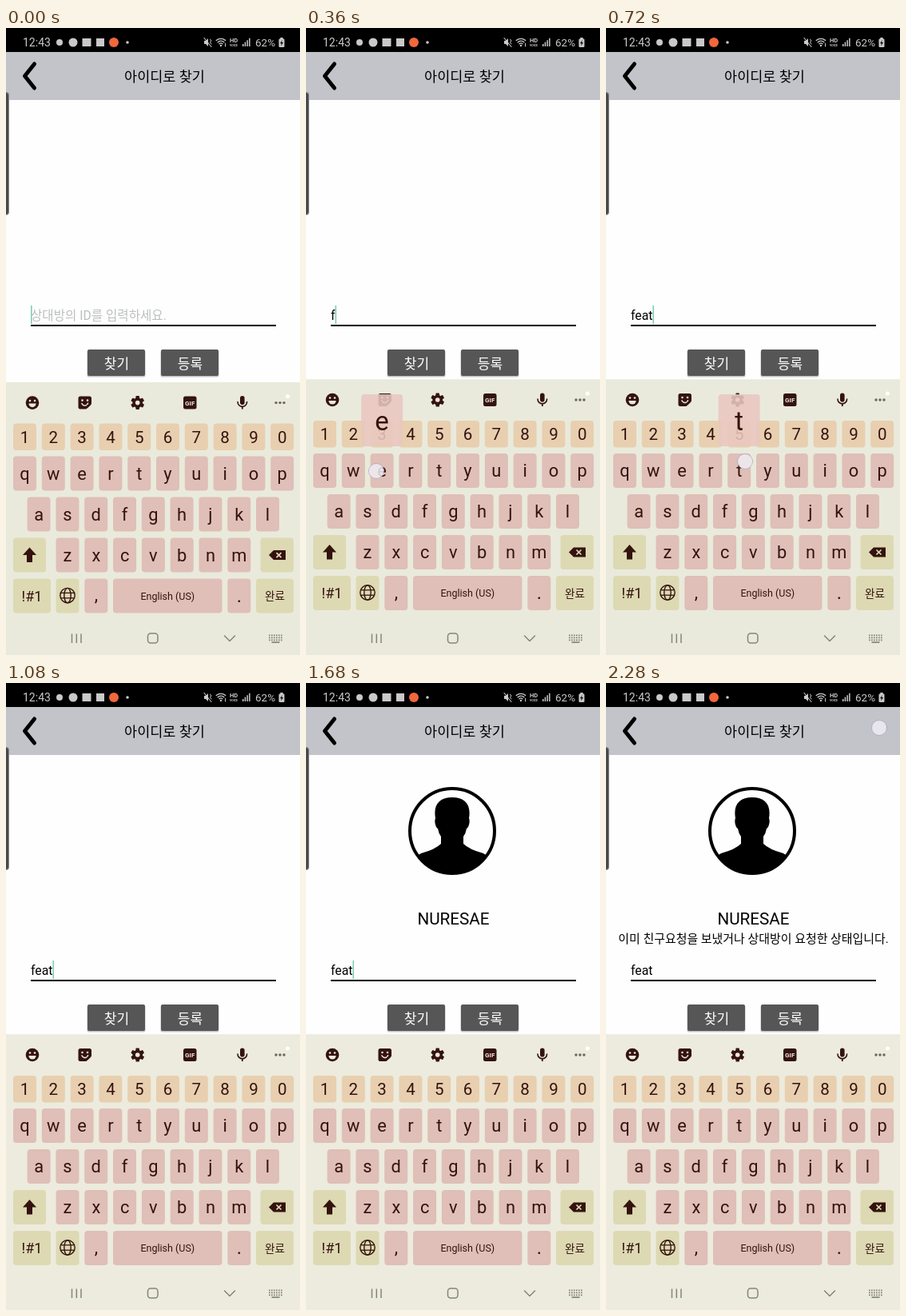
Animation, 368 px wide and 784 px high, one loop 2400 ms. Source, as an HTML page with a canvas:

```html
<!DOCTYPE html>
<html lang="ko">
<head>
<meta charset="utf-8">
<style>
html, body { margin: 0; width: 100%; height: 100%; overflow: hidden; background: #fff; }
canvas { display: block; width: 368px; height: 784px; }
</style>
</head>
<body>
<canvas id="stage"></canvas>
<script>
const W = 368, H = 784, LOOP = 2400, STEP = 120;
const FONT = 'Roboto, "Noto Sans CJK KR", "Noto Sans CJK", sans-serif';
const INK = '#34130f', GREY = '#c9c9c9', NAV = '#85857b';
const NAME = 'NURESAE', WORD = 'feat';
const PITCH = 35.8, KEY_W = 29, KEY_H = 43;

const canvas = document.getElementById('stage');
const dpr = window.devicePixelRatio || 1;
canvas.width = W * dpr;
canvas.height = H * dpr;
const c = canvas.getContext('2d');

// key presses: letter, finger position, popup span, commit time
const presses = [
  { ch: 'f', x: 150, y: 602, from: 220, to: 330, commit: 300 },
  { ch: 'e', x: 88, y: 554, from: 330, to: 450, commit: 420 },
  { ch: 'a', x: 42, y: 602, from: 450, to: 570, commit: 540 },
  { ch: 't', x: 174, y: 542, from: 600, to: 800, commit: 690 }
];
const taps = [
  { x: 118, y: 416, from: 1400, to: 1550, button: 0 },
  { x: 244, y: 421, from: 1900, to: 2030, button: 1 },
  { x: 342, y: 56, from: 2270, to: 2400 }
];
const rows = [
  { keys: '1234567890', x: 9, y: 491, h: 33.5, fill: '#e8cfb0', size: 20.5, base: 24 },
  { keys: 'qwertyuiop', x: 9, y: 532 },
  { keys: 'asdfghjkl', x: 26.6, y: 583 },
  { keys: 'zxcvbnm', x: 62.5, y: 634 }
];
const within = (t, p) => t >= p.from && t < p.to;

function box(x, y, w, h, r, fill) {
  c.beginPath();
  c.roundRect(x, y, w, h, r);
  c.fillStyle = fill;
  c.fill();
}
function disc(x, y, r, fill) {
  c.beginPath();
  c.arc(x, y, r, 0, Math.PI * 2);
  c.fillStyle = fill;
  c.fill();
}
function line(pts, color, width, cap = 'round') {
  c.beginPath();
  for (let i = 0; i < pts.length; i += 2) c.lineTo(pts[i], pts[i + 1]);
  c.strokeStyle = color;
  c.lineWidth = width;
  c.lineCap = cap;
  c.lineJoin = cap === 'round' ? 'round' : 'miter';
  c.stroke();
}
function poly(pts, fill) {
  c.beginPath();
  for (let i = 0; i < pts.length; i += 2) c.lineTo(pts[i], pts[i + 1]);
  c.closePath();
  c.fillStyle = fill;
  c.fill();
}
function arc(x, y, r, a, b, color, width) {
  c.beginPath();
  c.arc(x, y, r, a, b);
  c.strokeStyle = color;
  c.lineWidth = width;
  c.stroke();
}
function text(s, x, y, size, color, align = 'center', weight = 400) {
  c.font = `${weight} ${size}px ${FONT}`;
  c.textAlign = align;
  c.fillStyle = color;
  c.fillText(s, x, y);
}

function statusBar() {
  c.fillStyle = '#000';
  c.fillRect(0, 0, W, 30);
  text('12:43', 21, 23, 14, GREY, 'left');
  disc(67, 18, 4, GREY);
  disc(84, 18, 5.5, GREY);
  box(95.5, 13, 11, 10, 0, GREY);
  box(113, 13, 10, 10, 0, GREY);
  disc(135, 18, 6, '#f0683c');
  disc(152, 18, 1.8, GREY);

  // muted speaker
  poly([248, 16, 250, 16, 253, 13, 253, 23, 250, 20, 248, 20], GREY);
  line([248, 12.5, 257, 23.5], GREY, 1.1);
  line([255.5, 14, 257, 16, 255.5, 18, 257, 20], GREY, 1);
  // wireless
  for (const r of [3, 5.8, 8.6]) arc(269, 22, r, -2.3, -0.85, GREY, 1.4);
  disc(269, 22, 1.2, GREY);
  line([274.5, 19, 274.5, 23], GREY, 1);
  text('HD', 285, 17.5, 7.5, GREY, 'center', 700);
  text('VOICE', 285, 22.5, 3.6, GREY, 'center', 700);
  for (let i = 0; i < 4; i++) box(296 + i * 2.7, 20 - i * 2.4, 1.5, 3 + i * 2.4, 0, GREY);
  text('62%', 312, 23, 13.5, GREY, 'left');
  box(341.5, 13.5, 7, 10.5, 1.2, GREY);
  box(343.3, 12, 3.4, 2, 0, GREY);
  poly([345.8, 15, 343, 19.2, 344.8, 19.2, 344.2, 22.5, 347, 18, 345.2, 18], '#000');
}

function header() {
  c.fillStyle = '#c2c4ca';
  c.fillRect(0, 30, W, 60);
  line([35.5, 45, 23.5, 60, 35.5, 75], '#000', 5);
  text('아이디로 찾기', 198.5, 66.5, 17.5, '#000');
  box(-4, 80, 8, 154, 4, '#8b8b8d');
  box(-4, 81, 7, 152, 3.5, '#48484a');
}

function avatar() {
  c.save();
  c.beginPath();
  c.arc(183, 185, 53, 0, Math.PI * 2);
  c.clip();
  c.beginPath();
  c.moveTo(183, 143);
  c.bezierCurveTo(199, 143, 207, 152, 204, 169);
  c.bezierCurveTo(206, 174, 203, 182, 201, 182);
  c.quadraticCurveTo(200, 188, 197, 192);
  c.lineTo(197, 201);
  c.quadraticCurveTo(204, 208, 222, 213);
  c.quadraticCurveTo(232, 217, 240, 245);
  c.lineTo(126, 245);
  c.quadraticCurveTo(134, 217, 144, 213);
  c.quadraticCurveTo(162, 208, 169, 201);
  c.lineTo(169, 192);
  c.quadraticCurveTo(166, 188, 165, 182);
  c.bezierCurveTo(163, 182, 160, 174, 162, 169);
  c.bezierCurveTo(159, 152, 167, 143, 183, 143);
  c.fillStyle = '#000';
  c.fill();
  c.restore();
  arc(183, 185, 53, 0, Math.PI * 2, '#000', 4);
}

function form(t) {
  const typed = WORD.slice(0, presses.filter(p => t >= p.commit).length);
  if (typed) text(typed, 31, 365, 15.8, '#000', 'left');
  else text('상대방의 ID를 입력하세요.', 31, 364.5, 15.6, '#bcbfbf', 'left');

  const phase = t % 480;
  if (t < 840 || (phase >= 120 && phase < 360)) {
    c.font = `15.8px ${FONT}`;
    box(31 + c.measureText(typed).width, 347, 1.6, 23, 0, '#7fcdb9');
  }
  box(31, 371, 307, 2, 0, '#000');

  ['찾기', '등록'].forEach((label, i) => {
    const x = 102 + i * 92;
    const down = taps.some(p => p.button === i && within(t, p));
    box(x - 0.5, 403, 73, 33.5, 2, '#c4c4c4');
    box(x, 402, 72, 33, 2, down ? '#7a7a7a' : '#565656');
    text(label, x + 36.5, 425.5, 17, '#fff');
  });

  if (t >= 1560) {
    avatar();
    text(NAME, 184.5, 302, 20.7, '#000');
  }
  if (t >= 2040) {
    text('이미 친구요청을 보냈거나 상대방이 요청한 상태입니다.', 184.5, 324.5, 14.95, '#000');
  }
}

function toolbar(bg) {
  const y = 465;
  // smiley
  disc(33, y, 8.3, INK);
  disc(30, y - 2.5, 1.3, bg);
  disc(36, y - 2.5, 1.3, bg);
  c.beginPath();
  c.arc(33, y + 1, 4.6, 0, Math.PI);
  c.fillStyle = bg;
  c.fill();
  // sticker
  box(90.5, 457, 16.5, 16, 2.5, INK);
  disc(95.5, 462, 1.3, bg);
  disc(102, 462, 1.3, bg);
  arc(98.7, 464.5, 4, 0.3, 2.8, bg, 1.5);
  poly([107.5, 466, 107.5, 473.5, 100, 473.5], bg);
  poly([101.5, 472, 101.5, 467.5, 106.5, 467.5], INK);
  // gear
  for (let i = 0; i < 6; i++) {
    c.save();
    c.translate(164.7, y);
    c.rotate(i * Math.PI / 3);
    box(-2.3, -8.5, 4.6, 6, 1, INK);
    c.restore();
  }
  disc(164.7, y, 6.3, INK);
  disc(164.7, y, 2.8, bg);
  box(222, 457, 16.5, 16, 2.5, INK);
  text('GIF', 230.2, 468, 8, bg, 'center', 700);
  // microphone
  box(293, 456.5, 5.6, 11, 2.8, INK);
  arc(295.8, 464, 5.8, 0, Math.PI, INK, 1.6);
  line([295.8, 470, 295.8, 473], INK, 1.8, 'butt');
  for (const x of [338, 343, 348]) disc(x, y, 1.7, '#6f645b');
  disc(352.5, 457, 2.5, '#fff');
}

function keyboard(t) {
  const bg = t < 840 ? '#e9eadb' : '#ecebdd';
  const fn = '#ddd9b3', pink = '#dfbfb7';
  const drop = t < STEP ? 3.6 : 0;
  c.save();
  c.translate(0, drop);
  c.fillStyle = bg;
  c.fillRect(0, 439.3, W, H);
  toolbar(bg);

  for (const r of rows) {
    [...r.keys].forEach((k, i) => {
      const x = r.x + i * PITCH;
      box(x, r.y, KEY_W, r.h || KEY_H, 4, r.fill || pink);
      text(k, x + KEY_W / 2, r.y + (r.base || 29), r.size || 21.8, INK);
    });
  }

  // shift and delete
  box(9, 634, 41, KEY_H, 4, fn);
  poly([29.5, 646, 38, 655.5, 33, 655.5, 33, 664.5, 26, 664.5, 26, 655.5, 21, 655.5], INK);
  box(318.5, 634, 41.5, KEY_H, 4, fn);
  poly([329, 655.5, 335, 649.5, 350, 649.5, 350, 661.5, 335, 661.5], INK);
  line([338.5, 652.5, 344.5, 658.5], fn, 1.7, 'butt');
  line([344.5, 652.5, 338.5, 658.5], fn, 1.7, 'butt');

  // bottom row
  const y = 685;
  box(9, y, 47, KEY_H, 4, fn);
  text('!#1', 32.5, y + 28, 18, INK);
  box(62.5, y, KEY_W, KEY_H, 4, fn);
  arc(77, 706, 9.2, 0, Math.PI * 2, INK, 1.4);
  c.beginPath();
  c.ellipse(77, 706, 4.2, 9.2, 0, 0, Math.PI * 2);
  c.stroke();
  line([68.8, 702.8, 85.2, 702.8], INK, 1.3, 'butt');
  line([68.8, 709.2, 85.2, 709.2], INK, 1.3, 'butt');
  box(98.3, y, KEY_W, KEY_H, 4, pink);
  text(',', 112.8, y + 27.5, 22, INK);
  box(134, y, 136.5, KEY_H, 4, pink);
  text('English (US)', 202.3, y + 26, 12.5, INK);
  box(277.3, y, KEY_W, KEY_H, 4, pink);
  text('.', 291.8, y + 29, 24, INK);
  box(313, y, 47, KEY_H, 4, fn);
  text('완료', 336.5, y + 26.5, 13.6, INK);
  c.restore();
}

function navBar() {
  for (const x of [82.5, 88.3, 94]) line([x, 757.5, x, 769], NAV, 1.5, 'butt');
  c.beginPath();
  c.roundRect(177.5, 757, 12.5, 12, 3.5);
  c.lineWidth = 1.5;
  c.stroke();
  line([273.5, 760, 280, 766.5, 286.5, 760], NAV, 1.5);
  for (let r = 0; r < 3; r++) {
    for (let i = 0; i < 6; i++) box(329 + i * 3, 758.5 + r * 3, 1.7, 1.7, 0, NAV);
  }
  box(332.5, 767.3, 10, 1.7, 0, NAV);
}

function finger(p) {
  disc(p.x, p.y, 9.5, p.button === undefined ? 'rgba(238,236,242,.85)' : 'rgba(225,225,225,.5)');
  arc(p.x, p.y, 9.5, 0, Math.PI * 2, 'rgba(150,150,185,.55)', 1);
}

function popup(p) {
  const row = rows.find(r => r.keys.includes(p.ch));
  const mid = row.x + row.keys.indexOf(p.ch) * PITCH + KEY_W / 2;
  c.globalAlpha = 0.88;
  box(mid - 26, row.y - 74, 52, 65, 4, '#eac8c1');
  c.globalAlpha = 1;
  text(p.ch, mid, row.y - 29.5, 33, INK);
}

function draw(t) {
  c.setTransform(dpr, 0, 0, dpr, 0, 0);
  c.fillStyle = '#fefefe';
  c.fillRect(0, 0, W, H);
  statusBar();
  header();
  form(t);
  keyboard(t);
  navBar();
  for (const p of presses) {
    if (within(t, p)) {
      popup(p);
      finger(p);
    }
  }
  taps.filter(p => within(t, p)).forEach(finger);
}

function loop() {
  const t = performance.now() % LOOP;
  draw(Math.floor(t / STEP) * STEP);
  requestAnimationFrame(loop);
}
loop();
</script>
</body>
</html>
```
